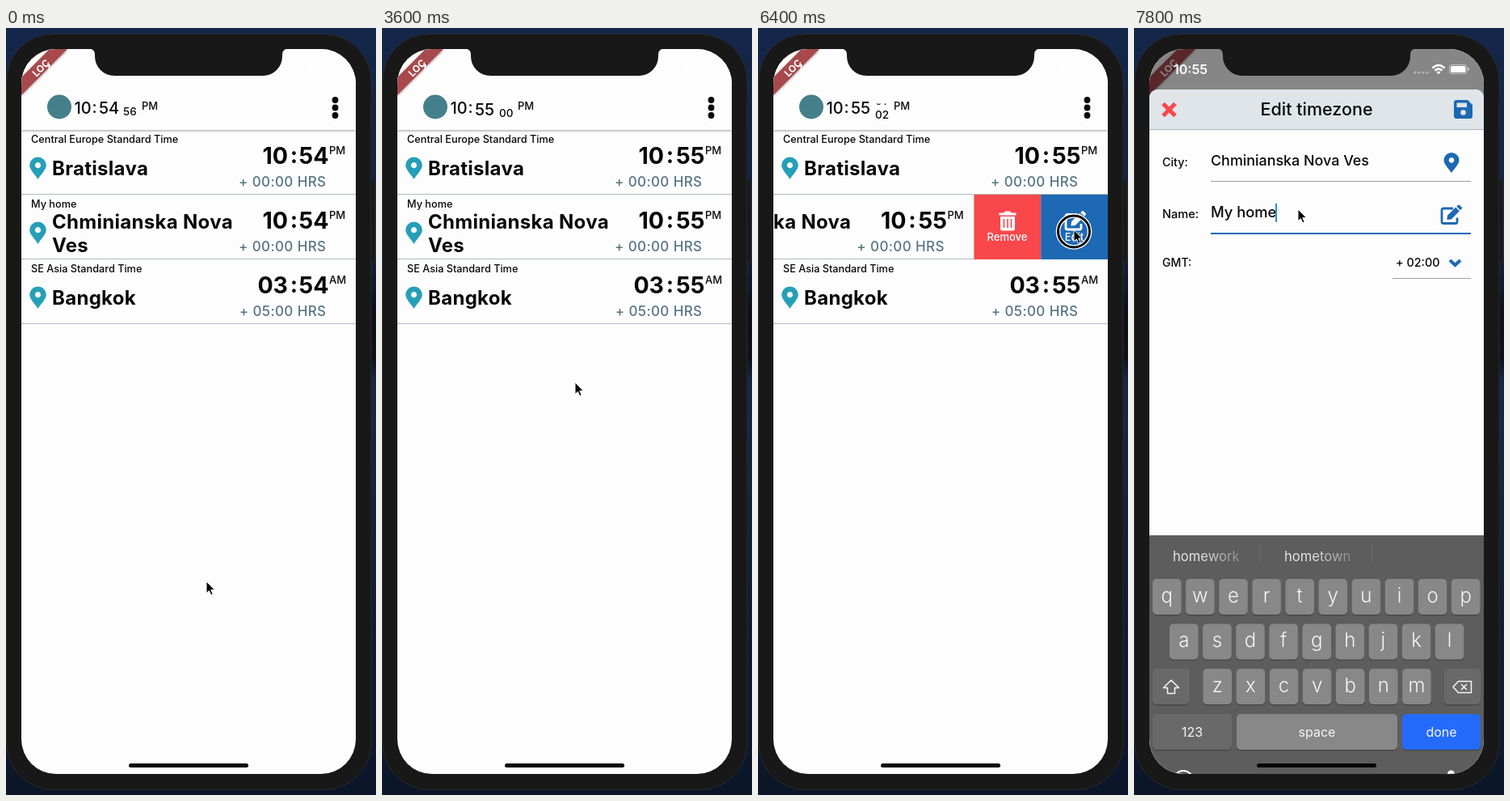
An HTML page for the animation above (8 s loop, 458 by 948 pixels).

```html
<!DOCTYPE html>
<html lang="en">
<head>
<meta charset="utf-8">
<title>World clock</title>
<style>
  html, body { margin: 0; width: 100%; height: 100%; overflow: hidden; background: #12203c; }
  svg { display: block; width: 100vw; height: 100vh; }
  text { font-family: Inter, "Noto Sans", sans-serif; font-weight: 500; white-space: pre; }
  .bold { font-weight: 700; }
  .city { font-weight: 700; letter-spacing: .3px; }
  .thin { font-weight: 300; }
  .plain { font-weight: 400; }
  .semi { font-weight: 600; }
  .mid { text-anchor: middle; }
  .end { text-anchor: end; }
</style>
</head>
<body>
<svg id="stage" viewBox="0 0 458 948" preserveAspectRatio="none"></svg>
<script>
const LOOP = 8000, STEP = 200, SLIDE = 300;
const BLUE = '#1d69b4', RED = '#fa474b', TEAL = '#259fb7', INK = '#080808', WHITE = '#fdfdfd';

// Drawing helpers
const text = (x, y, size, str, fill = INK, cls = '', extra = '') =>
  `<text x="${x}" y="${y}" font-size="${size}" fill="${fill}" class="${cls}" ${extra}>${str}</text>`;
const rect = (x, y, w, h, fill, r = 0, extra = '') =>
  `<rect x="${x}" y="${y}" width="${w}" height="${h}" rx="${r}" fill="${fill}" ${extra}/>`;
const line = (x1, x2, y, color = '#b3bac0', width = 1) =>
  `<path d="M${x1} ${y}H${x2}" stroke="${color}" stroke-width="${width}"/>`;
const at = (x, y, body) => `<g transform="translate(${x} ${y})">${body}</g>`;

const pin = (x, y, color) => at(x, y,
  `<path d="M0 27.5C-2 23-10.3 16-10.3 10.2A10.3 10.3 0 0 1 10.3 10.2C10.3 16 2 23 0 27.5ZM0 6.6a3.6 3.6 0 1 0 .01 0Z" fill="${color}" fill-rule="evenodd"/>`);
const editIcon = (x, y, color) => at(x, y,
  `<path d="M16 4.5H4a2 2 0 0 0-2 2V21a2 2 0 0 0 2 2H19a2 2 0 0 0 2-2V16" fill="none" stroke="${color}" stroke-width="2.8"/>
   <path d="M9 13.3 19.2 3.1 23.9 7.8 13.7 18 8.4 18.6ZM20.3 2 22 .4Q23 -.4 24 .4L26.6 3Q27.4 4 26.6 5L25 6.7Z" fill="${color}"/>`);
const trashIcon = at(298.5, 226.5,
  `<path d="M0 2H6L7.5 0H13.5L15 2H21V5H0ZM1.5 6.5H19.5V21Q19.5 24 17 24H4Q1.5 24 1.5 21Z" fill="#fff"/>
   <path d="M6 9.5V20.5M10.5 9.5V20.5M15 9.5V20.5" stroke="${RED}" stroke-width="1.6"/>`);
const saveIcon = at(396, 89,
  `<path d="M3 0H17L23 6V20Q23 23 20 23H3Q0 23 0 20V3Q0 0 3 0Z" fill="${BLUE}"/>
   <path d="M3.5 3.5H16V9H3.5Z" fill="#dfe5e8"/><circle cx="11.5" cy="15.5" r="3.3" fill="#dfe5e8"/>`);

// World clock list
const zone = (y, label, lines, hour, half, shift) => at(0, y,
  rect(19, 0, 414, 79.5, WHITE) + text(31, 16, 12.7, label) + pin(39.5, 33.5, TEAL) +
  lines.map((s, i) => text(57, (lines.length > 1 ? 42 : 55.5) + 29 * i, 24, s, INK, 'city')).join('') +
  text(349, 42, 28.5, hour, INK, 'bold end') + text(356.5, 41, 28, ':', INK, 'bold mid') +
  text(399.5, 42, 28.5, '54', INK, 'bold end minute') + text(400, 30, 13, half) +
  text(396.5, 70, 17, shift, '#587584', 'end', 'letter-spacing=".4"') + line(19, 433, 79.5));

const slot = (id, x, y, size) =>
  `<g clip-path="url(#${id}Clip)"><g id="${id}">${text(x, y, size, '')}${text(x, y, size, '')}</g></g>`;

const appBar = rect(19, 26, 414, 100, WHITE, 0, 'filter="url(#shadow)"') +
  '<circle cx="66" cy="97.5" r="15" fill="#447f8c"/>' +
  text(84.5, 106, 20, '10') + text(109.5, 105, 20, ':', INK, 'mid') +
  slot('minutes', 115, 106, 20) + slot('seconds', 145, 108, 13.5) + text(168, 101, 13, 'PM') +
  [89, 98.5, 108].map(y => `<circle cx="407.5" cy="${y}" r="3.9" fill="${INK}"/>`).join('');

const actions =
  rect(267.4, 206, 82.8, 80, RED) + trashIcon + text(308.5, 263, 13, 'Remove', '#fff', 'mid') +
  rect(350.2, 206, 82.8, 80, BLUE) + editIcon(379, 226, '#fff') + text(391.5, 263, 13, 'Edit', '#fff', 'mid');

const ribbon = '<g filter="url(#shadow)"><path d="M19 61 54 26H76L19 83Z" fill="#a8484e"/></g>' +
  text(0, 4, 12, 'LOC', '#fff', 'bold mid', 'transform="translate(43.5 49.5) rotate(-45)"');

// Edit form
const form =
  `<path d="M19 960V88Q19 76 31 76H421Q433 76 433 88V960Z" fill="${WHITE}"/>` +
  '<path d="M19 126V88Q19 76 31 76H421Q433 76 433 88V126Z" fill="#dfe5e8"/>' + line(19, 433, 125.5, '#a9b6be') +
  `<path d="M36 93.5 51 108.5M51 93.5 36 108.5" stroke="${RED}" stroke-width="5"/>` +
  text(226, 108, 21.5, 'Edit timezone', INK, 'mid') + saveIcon +
  text(35, 171, 14.3, 'City:') + text(95, 170, 17.9, 'Chminianska Nova Ves') +
  `<g transform="translate(393 154) scale(.92)">${pin(0, 0, BLUE)}</g>` + line(95, 417, 189.5, '#a0a0a0') +
  text(35, 235, 14.6, 'Name:') + text(95, 234, 18.3, 'My home') + editIcon(379, 218.5, BLUE) +
  line(95, 417, 253.5, '#a0a0a0') +
  text(35, 295, 14.1, 'GMT:') + text(324, 295, 14.4, '+ 02:00') +
  `<path d="M391 287 397.5 293 404 287" fill="none" stroke="${BLUE}" stroke-width="4"/>` +
  line(320, 417, 309.5, '#a0a0a0') +
  `<g id="focus">${line(95, 417, 254, BLUE, 2)}${rect(175, 217, 2, 23, '#2b8fd0')}</g>`;

// Keyboard
const key = (x, y, w, fill, label = '', size = 24, cls = 'thin') =>
  rect(x, y + 1, w, 44.5, '#484848', 5) + rect(x, y, w, 44, fill, 5) +
  text(x + w / 2, y + (size > 20 ? 28.5 : 27.5), size, label, '#f5f5f5', cls + ' mid');
const keyRow = (x, y, letters) =>
  [...letters].map((c, i) => key(x + 41.1 * i, y, 35.6, '#888', c)).join('');
const keyboard = rect(19, 627, 414, 360, '#5d5d5d') +
  text(48, 658.5, 16.6, 'homework', 'url(#fade)', 'plain') + text(186, 658.5, 16.6, 'hometown', 'url(#fade)', 'plain') +
  '<path d="M156.5 637V660M294.5 637V660" stroke="#6c6c6c"/>' +
  keyRow(23, 681, 'qwertyuiop') + keyRow(44, 736.5, 'asdfghjkl') + keyRow(85.5, 792, 'zxcvbnm') +
  key(23, 792, 46, '#696969') + key(384, 792, 45, '#696969') +
  '<g fill="none" stroke="#f5f5f5" stroke-width="1.5" stroke-linejoin="round">' +
  '<path d="M46 806 55.5 815.5H50.5V822.5H41.5V815.5H36.5Z"/>' +
  '<path d="M395 814.5 401.5 807.5H417.5V821.5H401.5ZM405 811 412 818M412 811 405 818"/></g>' +
  key(23, 848, 98, '#696969', '123', 16, 'plain') + key(127, 848, 199, '#888', 'space', 16, 'plain') +
  key(332, 848, 97, '#256bfb', 'done', 16, 'plain') +
  '<circle cx="61" cy="930" r="12" fill="none" stroke="#fff" stroke-width="2"/>' +
  rect(388, 917.5, 9, 20, '#fff', 4.5);

const statusBar = text(49, 56.5, 16, '10:55', '#fff', 'semi') +
  [348, 353, 358, 363].map(x => `<circle cx="${x}" cy="55" r="1.6" fill="#fff" opacity=".4"/>`).join('') +
  '<g fill="none" stroke="#fff" stroke-width="2.4"><path d="M369.5 49.5Q377 42.5 384.5 49.5M372.5 52.7Q377 48.5 381.5 52.7"/></g>' +
  '<path d="M374.4 54.6Q377 52.6 379.6 54.6L377 57.2Z" fill="#fff"/>' +
  rect(390.5, 45.5, 21.5, 11, 'none', 3, 'stroke="#fff" stroke-opacity=".5"') +
  rect(392, 47, 18.5, 8, '#fff', 1.6) + rect(413, 49, 1.6, 4, '#fff', .8, 'opacity=".6"');

const stage = document.getElementById('stage');
stage.innerHTML = `
<defs>
  <clipPath id="screen">${rect(19, 26, 414, 896, '#fff', 43)}</clipPath>
  <clipPath id="minutesClip">${rect(112, 89, 32, 25, '#fff')}</clipPath>
  <clipPath id="secondsClip">${rect(143, 93.5, 22, 20, '#fff')}</clipPath>
  <clipPath id="rowClip">${rect(19, 206, 414, 80, '#fff')}</clipPath>
  <filter id="shadow" x="-10%" y="-10%" width="120%" height="120%">
    <feDropShadow dx="0" dy="1" stdDeviation="1.8" flood-opacity=".4"/></filter>
  <linearGradient id="sky" x2="0" y2="1">
    <stop stop-color="#14274a"/><stop offset=".3" stop-color="#14203a"/><stop offset=".38" stop-color="#0b0f18"/>
    <stop offset=".43" stop-color="#0d121d"/><stop offset=".46" stop-color="#182745"/><stop offset="1" stop-color="#0b1629"/></linearGradient>
  <linearGradient id="fade"><stop offset=".4" stop-color="#e4e4e4"/><stop offset="1" stop-color="#8a8a8a"/></linearGradient>
</defs>
${rect(0, 0, 458, 948, 'url(#sky)')}
${rect(448, 188, 9, 102, '#17171a', 2, 'stroke="#2c2c32"')}
${rect(-2, 126, 6, 34, '#111', 1)}${rect(-2, 188, 6, 64, '#111', 1)}${rect(-2, 260, 6, 58, '#111', 1)}
${rect(.5, 7.5, 451.5, 934, '#181818', 58, 'stroke="#2a2b2f"')}
<g clip-path="url(#screen)">
  ${rect(19, 26, 414, 896, WHITE)}
  ${zone(126, 'Central Europe Standard Time', ['Bratislava'], '10', 'PM', '+ 00:00 HRS')}
  <g clip-path="url(#rowClip)"><g id="row">
    ${zone(206, 'My home', ['Chminianska Nova', 'Ves'], '10', 'PM', '+ 00:00 HRS')}
    ${at(165.6, 0, actions)}
  </g></g>
  ${zone(286, 'SE Asia Standard Time', ['Bangkok'], '03', 'AM', '+ 05:00 HRS')}
  ${appBar}${ribbon}
  ${rect(19, 26, 414, 896, '#000', 0, 'id="dim"')}
  <g id="form">${form}</g>
  <g id="keyboard">${keyboard}</g>
  ${statusBar}
</g>
<path d="M103 25.5Q110 26 110 33V35A24 24 0 0 0 134 59H318A24 24 0 0 0 342 35V33Q342 26 349 25.5Z" fill="#181818"/>
${rect(152, 909, 148, 5, '#050505', 2.5)}
<g id="pointer">
  <g id="ring" fill="none"><circle cy="2" r="19.5" stroke="#fff" stroke-width="5.6"/><circle cy="2" r="19.5" stroke="#000" stroke-width="3"/></g>
  <path d="M0 0V14.6L3.4 11.5 5.7 16.8 8.1 15.7 5.8 10.6H10.4Z" fill="#000" stroke="#fff"/>
</g>`;

// Motion tables: [time, values...]
const POINTER = [[0, 248, 684], [400, 248, 684], [1600, 236, 395], [2400, 236, 395], [3400, 239, 438], [3600, 239, 438],
  [4100, 365, 257], [4200, 365, 257], [4800, 199, 255], [5200, 199, 255], [6000, 391, 249], [6800, 391, 250], [7300, 203, 224]];
const ROW = [[4200, 0], [4800, -165.6]];
const FORM = [[6400, 850], [6800, 0]];
const DIM = [[6400, 0], [6800, .47]];
const KEYS = [[7400, 300], [7800, 0]];
const PRESSES = [[4200, 4800], [6200, 6600], [7400, 7600]];
const SECONDS = [[-SLIDE, '56'], [800, '57'], [1650, '58'], [2500, '59'], [3400, '00'], [4600, '01'], [6237, '02']];
const MINUTES = [[-SLIDE, '54'], [3400, '55']];

const smooth = u => u * u * (3 - 2 * u);
function track(table, t) {
  const next = table.findIndex(k => k[0] > t);
  if (next === 0) return table[0].slice(1);
  if (next < 0) return table[table.length - 1].slice(1);
  const a = table[next - 1], b = table[next];
  const u = smooth((t - a[0]) / (b[0] - a[0]));
  return a.slice(1).map((v, i) => v + (b[i + 1] - v) * u);
}

const $ = id => document.getElementById(id);
const move = (id, x, y) => $(id).setAttribute('transform', `translate(${x} ${y})`);
const show = (id, on) => $(id).setAttribute('visibility', on ? 'visible' : 'hidden');

// Old value leaves upward while the new one rises into place
function roll(id, table, t, height) {
  const i = table.filter(k => k[0] <= t).length - 1;
  const left = (1 - Math.min(1, (t - table[i][0]) / SLIDE)) ** 2;
  const [old, now] = $(id).children;
  old.textContent = i && left ? table[i - 1][1] : '';
  now.textContent = table[i][1];
  old.setAttribute('transform', `translate(0 ${-height})`);
  move(id, 0, height * left);
}

function draw(t) {
  roll('seconds', SECONDS, t, 17);
  roll('minutes', MINUTES, t, 20);
  for (const el of document.querySelectorAll('.minute')) el.textContent = t > 3400 ? '55' : '54';
  move('row', track(ROW, t)[0], 0);
  move('form', 0, track(FORM, t)[0]);
  move('keyboard', 0, track(KEYS, t)[0]);
  move('pointer', ...track(POINTER, t));
  $('dim').setAttribute('opacity', track(DIM, t)[0]);
  show('focus', t >= 7600);
  show('ring', PRESSES.some(([from, to]) => t >= from && t < to));
}

const start = performance.now();
function tick() {
  const t = (performance.now() - start) % LOOP;
  draw(Math.floor(t / STEP) * STEP);
  requestAnimationFrame(tick);
}
tick();
</script>
</body>
</html>
```
